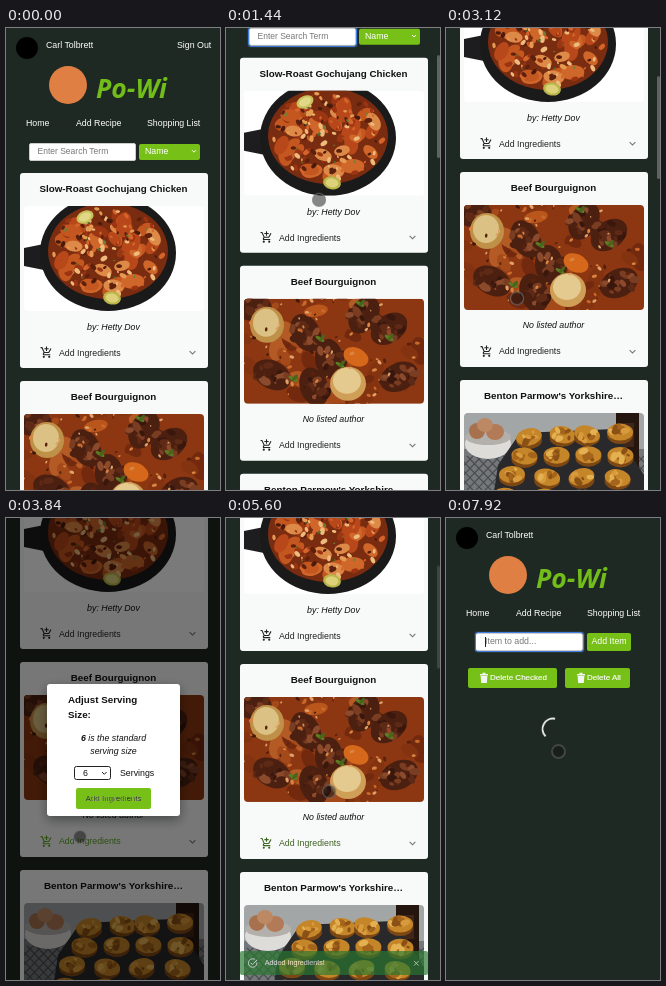
Animation of 214x462 px, one loop 8 s. Source, as an HTML page:

```html
<!DOCTYPE html>
<html lang="en">
<head>
<meta charset="utf-8">
<title>Recipe app</title>
<style>
html, body { margin: 0; width: 100%; height: 100%; overflow: hidden; background: #1e2923; }
#stage { position: relative; width: 214px; height: 462px; overflow: hidden; background: #1e2923;
  font: 8.8px/12px "Liberation Sans", Arial, sans-serif; color: #fff; }
#stage * { box-sizing: border-box; }
#stage div, #stage span, #stage svg { position: absolute; white-space: nowrap; }
#stage b, #stage i { position: static; }

/* every timeline lasts one loop: 1% = 80 ms */
.anim { animation: 8s linear infinite both; }
.layer { left: 0; top: 0; width: 214px; height: 462px; }
.mid { left: 0; width: 100%; text-align: center; }
.green { background: #77c017; border-radius: 2px; }
.btn { font-size: 8px; -webkit-text-stroke: .15px #fff; }
.field { background: #fff; border: 1px solid #ccc; border-radius: 2px; color: #777; font-size: 8.5px; line-height: 15px; padding-left: 8px; }
.ring { border: 1.5px solid #3f7ee0; border-radius: 3px; box-shadow: 0 0 1px #8db4f2; }

.avatar { left: 10px; top: 9px; width: 22px; height: 22px; border-radius: 50%; background: #000; }
.logo { left: 43px; top: 38px; width: 38px; height: 38px; border-radius: 50%; background: #df7f43; }
.brand { left: 90px; top: 42px; font: italic 700 26.5px/36px "Open Sans", "Noto Sans", sans-serif; color: #72bd1a; }

.card { left: 13.5px; width: 188px; height: 195px; border-radius: 3px; background: #f8f9f9; color: #111; }
.card .mid { font-style: italic; }
.card .title { top: 10px; font: 700 9.8px/12px "Liberation Sans", Arial, sans-serif; }
.photo { left: 4px; top: 33px; width: 180px; height: 105px; border-radius: 4px; overflow: hidden; }
.row { left: 0; top: 173px; width: 100%; height: 13px; color: #222; }
.row svg { width: 13px; height: 13px; top: 0; fill: currentColor; }
.more { color: #747474; }

.bar { left: 211px; top: 2px; width: 2.5px; height: 103px; border-radius: 2px; background: #6b736f; }
.shade { background: rgba(0,0,0,.52); }
.dialog { left: 41px; top: 166px; width: 133px; height: 132px; border-radius: 3px; background: #fff; color: #111;
  box-shadow: 0 4px 12px rgba(0,0,0,.4); }
.dialog .head { left: 21px; top: 9px; font: 700 9.8px/14.5px "Liberation Sans", Arial, sans-serif; }
.pick { left: 27px; top: 82px; width: 37px; height: 13.5px; border: 1px solid #222; border-radius: 2.5px; line-height: 12px; padding-left: 8px; }
.toast { left: 6px; top: 432px; width: 204px; height: 26px; border-radius: 2.5px; background: #2b7a32;
  font-size: 7.75px; -webkit-text-stroke: .15px #fff; }
.dot { left: -7px; top: -7px; width: 14px; height: 14px; border-radius: 50%; background: rgba(20,20,20,.5); border: 1.3px solid rgba(128,128,128,.75); }

.scroll { animation-name: scroll; }
@keyframes scroll {
  0%, 11.5% { transform: translateY(0); }
  14% { transform: translateY(-48px); }
  18% { transform: translateY(-115px); animation-timing-function: cubic-bezier(.25,.45,.6,.9); }
  29% { transform: translateY(-198px); animation-timing-function: ease-out; }
  34%, 69.5% { transform: translateY(-209px); animation-timing-function: ease-in; }
  76.5% { transform: translateY(0); animation-timing-function: ease-out; }
  78% { transform: translateY(6px); }
  79% { transform: translateY(4px); animation-timing-function: ease-out; }
  82%, 100% { transform: translateY(0); }
}
.bar { animation-name: bar, barfade; }
@keyframes bar {
  0%, 11.5% { transform: translateY(0); }
  14% { transform: translateY(10.5px); }
  18% { transform: translateY(25px); animation-timing-function: cubic-bezier(.25,.45,.6,.9); }
  29% { transform: translateY(43.5px); animation-timing-function: ease-out; }
  34%, 69.5% { transform: translateY(46px); animation-timing-function: ease-in; }
  76.5%, 100% { transform: translateY(0); }
}
@keyframes barfade {
  0%, 11.5% { opacity: 0; }
  12.5%, 40% { opacity: .8; }
  44%, 69.5% { opacity: 0; }
  70.5%, 80% { opacity: .8; }
  84%, 100% { opacity: 0; }
}
.cursor { left: 0; top: 0; animation-name: cursor; animation-timing-function: ease-in-out; }
@keyframes cursor {
  0%, 1% { transform: translate(120px, 476px); }
  7%, 8.5% { transform: translate(82px, 124px); }
  11.5% { transform: translate(90px, 285px); animation-timing-function: linear; }
  18% { transform: translate(93px, 172px); animation-timing-function: cubic-bezier(.25,.45,.6,.9); }
  29% { transform: translate(104px, 94px); }
  39% { transform: translate(71px, 270px); animation-timing-function: ease-out; }
  42%, 46% { transform: translate(72px, 322px); }
  57%, 69% { transform: translate(102px, 276px); }
  79% { transform: translate(160px, 156px); }
  86.5%, 91.5% { transform: translate(168px, 97px); }
  99%, 100% { transform: translate(112.5px, 233.5px); }
}
.focus { animation-name: focus; animation-timing-function: step-end; }
@keyframes focus { 0% { opacity: 0; } 8% { opacity: 1; } 42%, 100% { opacity: 0; } }
.modal { animation-name: modal; }
@keyframes modal { 0%, 42.5% { opacity: 0; } 45.3%, 67% { opacity: 1; } 69.5%, 100% { opacity: 0; } }
.hover { animation-name: hover; }
@keyframes hover { 0%, 41% { color: #222; } 42.5%, 69% { color: #5aa51f; } 71%, 100% { color: #222; } }
.toast { animation-name: toast; }
@keyframes toast {
  0%, 68.5% { opacity: 0; transform: scale(.75); animation-timing-function: ease-out; }
  71.5%, 100% { opacity: 1; transform: none; }
}
.home { animation-name: home; animation-timing-function: step-end; }
@keyframes home { 0% { visibility: visible; } 93%, 100% { visibility: hidden; } }
.list { animation-name: list; animation-timing-function: step-end; }
@keyframes list { 0% { visibility: hidden; } 93%, 100% { visibility: visible; } }
.spin { left: 94px; top: 198px; width: 26px; height: 26px; animation: spin 1s linear infinite; }
@keyframes spin { from { transform: rotate(28.8deg); } to { transform: rotate(388.8deg); } }
</style>
</head>
<body>
<div id="stage">
  <div class="layer anim scroll">
    <div class="avatar"></div>
    <span style="left:40px;top:10.5px">Carl Tolbrett</span>
    <div class="logo"></div>
    <div class="brand">Po-Wi</div>
    <span style="left:20px;top:89px">Home</span>
    <span style="left:70px;top:89px">Add Recipe</span>
    <span style="left:141px;top:89px">Shopping List</span>

    <div class="layer anim home">
      <span style="left:171px;top:10.5px">Sign Out</span>
      <div class="field" style="left:22.5px;top:115px;width:107px;height:17.5px">Enter Search Term</div>
      <div class="ring anim focus" style="left:21.5px;top:114px;width:109px;height:19.5px"></div>
      <div class="green" style="left:133px;top:116px;width:60.5px;height:15.5px;line-height:15.5px;padding-left:6px">Name
        <svg style="left:52px;top:5px" width="6" height="5" fill="none" stroke="#fff"><path d="M1 1.2l2 2 2-2"/></svg>
      </div>
      <div id="cards" style="left:0;top:0"></div>
    </div>
  </div>

  <div class="layer anim list">
    <div class="field" style="left:29px;top:115px;width:108px;height:17.5px;padding-left:9px;font-size:8.8px">Item to add...</div>
    <div class="ring" style="left:28.5px;top:114px;width:109px;height:19.5px"></div>
    <div style="left:39px;top:119px;width:.8px;height:10px;background:#222"></div>
    <div class="green" style="left:141px;top:115px;width:44px;height:17.5px;line-height:17.5px;text-align:center">Add Item</div>
    <div class="green btn" style="left:22px;top:150px;width:88.5px;height:20px;line-height:20px;padding-left:22px">Delete Checked</div>
    <div class="green btn" style="left:119px;top:150px;width:65px;height:20px;line-height:20px;padding-left:22px">Delete All</div>
    <svg class="layer" fill="#f2f5f2">
      <path id="bin" d="M34 156h8v1.5h-8zM36.5 154.8h3v1.2h-3zM34.6 158h6.8l-.6 7h-5.6z"/>
      <use href="#bin" x="97"/>
    </svg>
    <svg class="spin" viewBox="-13 -13 26 26"><path d="M2 -10.3A10.5 10.5 0 0 0 -7.4 7.4" fill="none" stroke="#e4e7e5" stroke-width="2"/></svg>
  </div>

  <div class="anim bar"></div>

  <div class="layer anim modal">
    <div class="layer shade"></div>
    <div class="dialog">
      <div class="head">Adjust Serving<br>Size:</div>
      <div class="mid" style="top:47.5px;line-height:13px"><i><b>6</b> is the standard<br>serving size</i></div>
      <div class="pick">6<svg style="left:26px;top:4px" width="7" height="5" fill="none" stroke="#222"><path d="M1 1l2.3 2.3L5.6 1"/></svg></div>
      <span style="left:73px;top:83px">Servings</span>
      <div class="green btn" style="left:29px;top:104px;width:75px;height:21px;line-height:21px;text-align:center">Add Ingredients</div>
    </div>
  </div>

  <div class="layer anim home">
    <div class="toast anim">
      <svg style="left:8px;top:7px" width="12" height="12" fill="none" stroke="#fff"><path d="M10.3 5.2A4.6 4.6 0 1 1 8 2M3.8 5.7l2 2L10.6 2.6"/></svg>
      <span style="left:27px;top:7px">Added Ingredients!</span>
      <svg style="left:188px;top:10px" width="7" height="7" stroke="#fff"><path d="M.8 .8l5 5M5.8 .8l-5 5"/></svg>
    </div>
  </div>

  <div class="anim cursor"><div class="dot"></div></div>
</div>

<script>
const CART = "M11 9h2V6h3V4h-3V1h-2v3H8v2h3v3zm-4 9a2 2 0 1 0 0 4 2 2 0 0 0 0-4zm10 0a2 2 0 1 0 0 4 2 2 0 0 0 0-4zm-9.8-3.2l.9-1.8h7.5c.7 0 1.4-.4 1.7-1l3.9-7L19.4 4l-3.9 7h-7L4.3 2H1v2h2l3.6 7.6-1.4 2.4c-.7 1.4.3 3 1.8 3h12v-2H7.4z";
const CHEVRON = "M7.4 8.6L12 13.2l4.6-4.6L18 10l-6 6-6-6z";

function seeded(s) {
  return () => (s = (s * 16807) % 2147483647) / 2147483647;
}
const oval = (x, y, rx, ry, fill, turn = 0) =>
  `<ellipse cx="${x.toFixed(1)}" cy="${y.toFixed(1)}" rx="${rx.toFixed(1)}" ry="${ry.toFixed(1)}" fill="${fill}" transform="rotate(${turn | 0} ${x.toFixed(1)} ${y.toFixed(1)})"/>`;
const rect = (x, y, w, h, fill) => `<rect x="${x}" y="${y}" width="${w}" height="${h}" fill="${fill}"/>`;

// scatter n blobs inside an ellipse
function scatter(rnd, n, cx, cy, rx, ry, size, colors) {
  let out = "";
  for (let i = 0; i < n; i++) {
    const a = rnd() * 6.283, d = Math.sqrt(rnd()), r = size * (.5 + rnd());
    out += oval(cx + rx * d * Math.cos(a), cy + ry * d * Math.sin(a), r, r * .62,
      colors[rnd() * colors.length | 0], rnd() * 180);
  }
  return out;
}

function chicken() {
  const rnd = seeded(71);
  return rect(0, 0, 180, 105, "#fff") +
    '<path d="M30 36L0 42V60L30 66z" fill="#1d1d1f"/>' +
    oval(84, 47, 68, 58, "#1b1a1b") + oval(84, 45, 60, 48, "#7a2c10") +
    scatter(rnd, 40, 84, 45, 50, 39, 9, ["#b8481a", "#d0672a", "#c4561f", "#dd8a48", "#9a3612"]) +
    scatter(rnd, 120, 84, 45, 56, 44, 2.6, ["#e59a52", "#4a1a0c", "#edbb7c", "#9c3413", "#d5642a", "#5c200d"]) +
    scatter(rnd, 18, 84, 45, 55, 42, 1.5, ["#4f6b2a", "#6d7f35"]) +
    oval(61, 11, 9, 6, "#c9c25a", -25) + oval(61, 11, 6.5, 4, "#e0d886", -25) +
    oval(88, 92, 9, 6.5, "#b9b64a", 10) + oval(88, 92, 6.5, 4.5, "#ddd27a", 10);
}

function beef() {
  const rnd = seeded(29);
  const meat = [[62, 34], [145, 30], [28, 76], [120, 16], [155, 78], [85, 60], [70, 88], [8, 8]];
  const herbs = [[49, 80], [76, 40], [145, 39], [96, 66], [116, 5]];
  return rect(0, 0, 180, 105, "#8c3712") +
    scatter(rnd, 36, 90, 52, 95, 58, 10, ["#a44a1a", "#72290d", "#b35a25", "#843311"]) +
    meat.map(([x, y]) => oval(x, y, 20, 14, "#4c2011", x) +
      scatter(rnd, 16, x, y, 17, 12, 4.5, ["#5e2a16", "#7a3d22", "#3a170c", "#8b4a2c", "#4c2011"])).join("") +
    oval(112, 58, 13, 9, "#d5681a", 25) + oval(72, 12, 12, 6, "#b9561b", -10) +
    oval(23, 26, 17, 18, "#bf9048") + oval(22, 24, 13, 14, "#dcc184") +
    oval(104, 85, 18, 17, "#cf9f58") + oval(103, 82, 14, 13, "#e5ca90") +
    scatter(rnd, 90, 90, 52, 98, 58, 1.8, ["#d98440", "#45190a", "#c9682a", "#e0a068", "#5a210d"]) +
    herbs.map(([x, y]) => oval(x, y, 5, 1.8, "#5b7d22", 30) + oval(x + 2, y - 1, 4, 1.6, "#45661b", -50)).join("");
}

function puddings() {
  const rnd = seeded(53);
  let out = rect(0, 0, 180, 105, "#a3a6a7") + rect(0, 36, 180, 69, "#75787b");
  for (let x = -60; x < 180; x += 9)
    out += `<path d="M${x} 105l60-62M${x} 43l60 62" stroke="#4a4d50" stroke-width="1.2"/>`;
  out += rect(152, 0, 23, 54, "#24150f") + rect(157, 10, 13, 24, "#40251a") +
    oval(24, 31, 23, 15, "#dddcd9") + oval(24, 24, 23, 8, "#b3b0ab") +
    oval(13, 18, 8, 8, "#a8714e") + oval(31, 19, 9, 8, "#b27a56") + oval(21, 12, 8, 7, "#bd8864") +
    '<path d="M56 20L150 16L180 62V105H26L34 52z" fill="#29292b"/>';
  for (let row = 0; row < 4; row++)
    for (let col = 0; col < 4; col++) {
      const x = 65 - row * 9 + col * (29 + row * 3) + rnd() * 5, y = 19 + row * 21 + rnd() * 5;
      out += oval(x, y + 3, 13, 9, "#7d4714") + oval(x, y, 13, 8.5, "#c58529", rnd() * 30 - 15) +
        scatter(rnd, 8, x, y, 9, 6, 3.6, ["#e3b152", "#a5641b", "#d79a3c", "#8a5016"]);
    }
  return out;
}

function card(i, title, author, art) {
  const icon = (x, d) => `<svg viewBox="0 0 24 24" style="left:${x}px"><path d="${d}"/></svg>`;
  return `<div class="card" style="top:${145 + i * 207.8}px">
    <div class="mid title">${title}</div>
    <svg class="photo" viewBox="0 0 180 105">${art}</svg>
    <div class="mid" style="top:147.5px">${author}</div>
    <div class="row ${i === 1 ? "anim hover" : ""}">${icon(20, CART)}<span style="left:39.5px;top:.5px">Add Ingredients</span></div>
    <div class="row more">${icon(166.5, CHEVRON)}</div>
  </div>`;
}

document.getElementById("cards").innerHTML =
  card(0, "Slow-Roast Gochujang Chicken", "by: Hetty Dov", chicken()) +
  card(1, "Beef Bourguignon", "No listed author", beef()) +
  card(2, "Benton Parmow's Yorkshire…", "No listed author", puddings());
</script>
</body>
</html>
```
